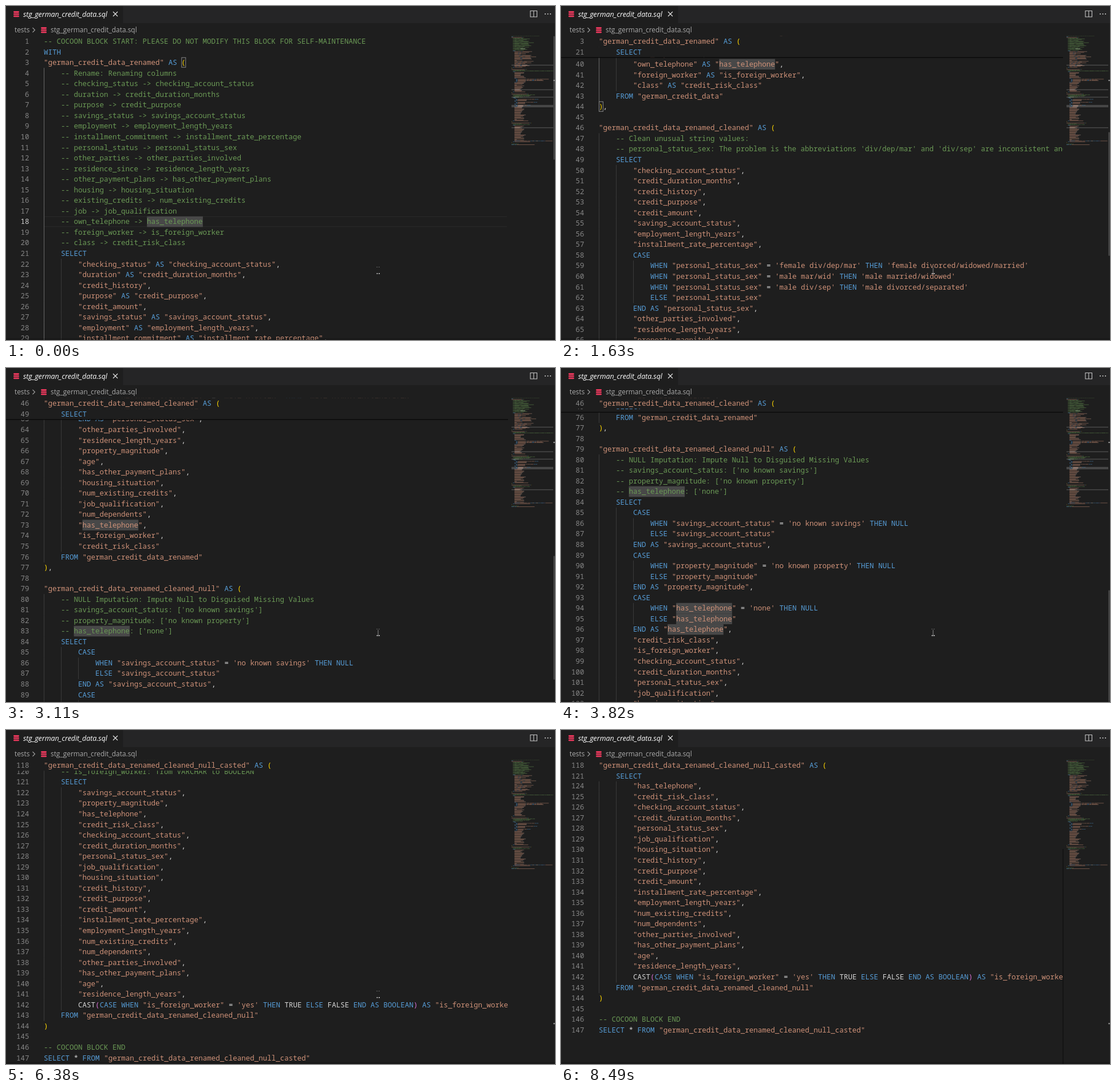
Recreate the animation shown at these times as an HTML page with a canvas. Size 959 by 584 pixels, loop 8.74 s.

```html
<!DOCTYPE html>
<html lang="en">
<head>
<meta charset="utf-8">
<title>stg_german_credit_data.sql</title>
<style>
  html, body { margin: 0; width: 100%; height: 100%; overflow: hidden; background: #1e1e1e; }
  canvas { display: block; }
</style>
</head>
<body>
<canvas id="stage" width="959" height="584"></canvas>
<script>
const ctx = document.getElementById('stage').getContext('2d');
const LOOP = 8740, CLICK = 4900;
const TOP = 52.6, LINE = 18.544, CHAR = 7.51, LEFT = 66, RIGHT = 877, WHEEL = 48.8;
const MAP = { x: 883, y: 52, line: 1.3015, char: 0.651 };
const CODE_FONT = '12.515px "Noto Sans Mono", monospace';
const UI_FONT = '11.9px "Open Sans", sans-serif';
const COLORS = { bg: '#1e1e1e', comment: '#6a9955', keyword: '#569cd6', string: '#ce9178', plain: '#d4d4d4' };
const WORD = 'has_telephone';

// ---- document text ----
const renames = ('checking_status>checking_account_status duration>credit_duration_months credit_history ' +
  'purpose>credit_purpose credit_amount savings_status>savings_account_status ' +
  'employment>employment_length_years installment_commitment>installment_rate_percentage ' +
  'personal_status>personal_status_sex other_parties>other_parties_involved ' +
  'residence_since>residence_length_years property_magnitude age ' +
  'other_payment_plans>has_other_payment_plans housing>housing_situation ' +
  'existing_credits>num_existing_credits job>job_qualification num_dependents ' +
  'own_telephone>has_telephone foreign_worker>is_foreign_worker class>credit_risk_class')
  .split(' ').map(s => s.split('>'));
const target = renames.map(r => r[r.length - 1]);
const rest = ('checking_account_status credit_duration_months personal_status_sex job_qualification ' +
  'housing_situation credit_history credit_purpose credit_amount installment_rate_percentage ' +
  'employment_length_years num_existing_credits num_dependents other_parties_involved ' +
  'has_other_payment_plans age residence_length_years').split(' ');

const quote = s => `"${s}"`;
const columns = names => names.map(n => `        ${quote(n)},`);
const withoutComma = list => [...list.slice(0, -1), list[list.length - 1].replace(/,$/, '')];
const caseOf = (name, whens) => ['        CASE',
  ...whens.map(([from, to]) => `            WHEN "${name}" = '${from}' THEN ${to}`),
  `            ELSE "${name}"`, `        END AS "${name}",`];
const block = (name, notes, body, from, close = '),') => [`"${name}" AS (`,
  ...notes.map(n => '    -- ' + n), '    SELECT', ...body, `    FROM "${from}"`, close, ''];

const BASE = 'german_credit_data', RENAMED = BASE + '_renamed', CLEANED = RENAMED + '_cleaned',
  NULLED = CLEANED + '_null', CASTED = NULLED + '_casted';
const lines = [
  '-- COCOON BLOCK START: PLEASE DO NOT MODIFY THIS BLOCK FOR SELF-MAINTENANCE',
  'WITH',
  ...block(RENAMED,
    ['Rename: Renaming columns', ...renames.filter(r => r[1]).map(r => r.join(' -> '))],
    withoutComma(renames.map(r => `        ${r.map(quote).join(' AS ')},`)), BASE),
  ...block(CLEANED,
    ['Clean unusual string values:',
      "personal_status_sex: The problem is the abbreviations 'div/dep/mar' and 'div/sep' are inconsistent and unclear."],
    [...columns(target.slice(0, 8)),
      ...caseOf('personal_status_sex', [
        ['female div/dep/mar', "'female divorced/widowed/married'"],
        ['male mar/wid', "'male married/widowed'"],
        ['male div/sep', "'male divorced/separated'"]]),
      ...withoutComma(columns(target.slice(9)))], RENAMED),
  ...block(NULLED,
    ['NULL Imputation: Impute Null to Disguised Missing Values',
      "savings_account_status: ['no known savings']",
      "property_magnitude: ['no known property']", "has_telephone: ['none']"],
    [...caseOf('savings_account_status', [['no known savings', 'NULL']]),
      ...caseOf('property_magnitude', [['no known property', 'NULL']]),
      ...caseOf(WORD, [['none', 'NULL']]),
      ...withoutComma(columns(['credit_risk_class', 'is_foreign_worker', ...rest]))], CLEANED),
  ...block(CASTED,
    ['Column Type Casting:', 'is_foreign_worker: from VARCHAR to BOOLEAN'],
    [...columns(['savings_account_status', 'property_magnitude', WORD, 'credit_risk_class', ...rest]),
      `        CAST(CASE WHEN "is_foreign_worker" = 'yes' THEN TRUE ELSE FALSE END AS BOOLEAN) AS "is_foreign_worker"`],
    NULLED, ')'),
  '-- COCOON BLOCK END',
  `SELECT * FROM "${CASTED}"`
];

// ---- syntax colours, indents and foldable ranges ----
const KEYWORD = /^(WITH|AS|SELECT|FROM|CASE|WHEN|THEN|ELSE|END|NULL|BOOLEAN)$/;
function tokenColor(text, line) {
  if (text.startsWith('--')) return COLORS.comment;
  if (/^["']/.test(text)) return COLORS.string;
  if (/^[()]$/.test(text)) return line.includes('CAST(') ? '#da70d6' : '#ffd700';
  return KEYWORD.test(text) ? COLORS.keyword : COLORS.plain;
}
const tokens = lines.map(line => [...line.matchAll(/--.*|"[^"]*"|'[^']*'|\w+|[^\s\w]/g)]
  .map(m => ({ text: m[0], col: m.index, color: tokenColor(m[0], line) })));
const depth = lines.map(line => line ? line.search(/\S/) / 4 : 0);
const marks = lines.map(line => [...line.matchAll(/\bhas_telephone\b/g)].map(m => m.index));
const ranges = [];
depth.forEach((d, i) => {
  if (!(depth[i + 1] > d)) return;
  let end = i + 1;
  while (depth[end + 1] > d) end++;
  ranges.push({ start: i, end, depth: d });
});

// ---- timeline: [ms, wheel notches] ----
const scrolls = [[0, 0], [250, 2], [370, 5], [490, 7], [640, 9], [1360, 12], [1630, 14],
  [2590, 17], [2710, 20], [3110, 23], [3540, 26], [3820, 28], [4660, 29], [4780, 30],
  [5300, 36], [5420, 39], [5570, 41], [6380, 45], [7860, 46]];
const pointers = [[0, 650, 463], [7060, 681, 498], [7210, 867, 578], [7330, 0, -50]];
const at = (table, t) => table.filter(row => row[0] <= t).pop();

// ---- drawing ----
function rect(x, y, w, h, color) {
  ctx.fillStyle = color;
  ctx.fillRect(x, y, w, h);
}
function label(text, x, y, color, font, align = 'left') {
  ctx.font = font;
  ctx.textAlign = align;
  ctx.fillStyle = color;
  ctx.fillText(text, x, y);
}
function stroke(path, color, width = 1) {
  ctx.strokeStyle = color;
  ctx.lineWidth = width;
  ctx.stroke(new Path2D(path));
}
const colX = col => LEFT + col * CHAR;

function drawCode(i, y, active) {
  label(i + 1, 40.5, y + 13.5, active ? '#d0d0d0' : '#858585', CODE_FONT, 'right');
  for (const t of tokens[i]) label(t.text, colX(t.col), y + 13.5, t.color, CODE_FONT);
}

function drawLine(i, y, s) {
  if (i === s.current) {
    rect(LEFT, y, 809, 1, '#2b2b2b');
    rect(LEFT, y + LINE - 1, 809, 1, '#2b2b2b');
  }
  for (let k = 0; k < depth[i]; k++) {
    const lit = k === s.guide.depth && i > s.guide.start && i <= s.guide.end;
    rect(LEFT + k * 4 * CHAR, y, 1, LINE + 0.5, lit ? '#6a6a6a' : '#3c3c3c');
  }
  if (!s.clicked) for (const col of marks[i]) rect(colX(col), y, WORD.length * CHAR, LINE, '#484848');
  if (i === s.guide.outer.start || i === s.guide.outer.end + 1) {
    const col = lines[i].search(/[()]/);
    ctx.strokeStyle = '#888';
    ctx.lineWidth = 1;
    ctx.strokeRect(colX(col) + 0.5, y + 0.5, CHAR - 0.5, LINE - 1.5);
  }
  drawCode(i, y, i === s.current);
  if (s.clicked && i === s.current) rect(colX(lines[i].length), y, 2, LINE - 1, '#aeafad');
}

function drawEditor(s) {
  ctx.save();
  ctx.beginPath();
  ctx.rect(0, TOP, RIGHT, 584 - TOP);
  ctx.clip();
  const first = Math.floor(s.scroll / LINE);
  for (let i = first; i < Math.min(lines.length, first + 30); i++) drawLine(i, TOP + i * LINE - s.scroll, s);

  // Pinned headers; an ending block pushes its own header up.
  let bottom = 0;
  const pinned = ranges.filter(r => r.start * LINE - s.scroll < r.depth * LINE &&
    (r.end + 1) * LINE - s.scroll > r.depth * LINE);
  for (const r of pinned.reverse()) {
    const y = Math.min(r.depth * LINE, (r.end + 1) * LINE - s.scroll - LINE);
    bottom = Math.max(bottom, y + LINE);
    rect(0, TOP + y, RIGHT, LINE, COLORS.bg);
    drawCode(r.start, TOP + y, false);
  }
  if (bottom && !s.clicked) rect(0, TOP + bottom - 0.3, RIGHT, 1.4, '#0a0a0a');
  ctx.restore();
}

function drawMinimap(s, t) {
  ctx.save();
  ctx.beginPath();
  ctx.rect(MAP.x, 50, 73, 534);
  ctx.clip();
  lines.forEach((line, i) => {
    const y = MAP.y + i * MAP.line;
    if (!s.clicked && marks[i].length) {
      if (i !== s.current) rect(MAP.x, y, 73, 1.4, '#4c4c4c');
      for (const col of marks[i]) rect(MAP.x + col * MAP.char, y, WORD.length * MAP.char, 1.3, '#707070');
    }
    ctx.globalAlpha = 0.5;
    for (const token of tokens[i])
      for (const m of token.text.matchAll(/\S+/g))
        rect(MAP.x + (token.col + m.index) * MAP.char, y, m[0].length * MAP.char, 0.9, token.color);
    ctx.globalAlpha = 1;
  });
  ctx.restore();
  rect(956, TOP + s.scroll * 0.246, 3, 216, '#424242');
  rect(956, TOP + s.current * LINE * 0.246 - 1, 3, 2, '#8a8a8a');
  const shade = Math.min(1, Math.max(0, (t - 7740) / 600));
  rect(876, 208, 2, 376, `rgba(0,0,0,${0.35 * shade})`);
}

function drawDatabase(x, y) {
  ctx.fillStyle = '#e8385c';
  for (let k = 0; k < 3; k++) {
    ctx.beginPath();
    ctx.roundRect(x - 5, y - 5 + k * 3.7, 10, 2.9, 1.4);
    ctx.fill();
  }
}

function drawHeader() {
  rect(0, 0, 959, TOP, COLORS.bg);
  rect(204.5, 0, 755, 30, '#252526');
  drawDatabase(18, 14);
  label('stg_german_credit_data.sql', 30, 18.5, '#fff', 'italic 12.4px "Open Sans", sans-serif');
  stroke('M187 10 L195 18 M195 10 L187 18', '#e8e8e8', 1.1);
  stroke('M916 8.5 H927.5 V19 H916 Z M921.8 8.5 V19', '#c5c5c5', 1.1);
  for (let k = 0; k < 3; k++) rect(941 + k * 4.6, 13, 1.8, 1.8, '#c5c5c5');
  label('tests', 15, 46, '#a9a9a9', UI_FONT);
  stroke('M46.5 38 L50.5 42 L46.5 46', '#a0a0a0', 1.1);
  drawDatabase(66, 42);
  label('stg_german_credit_data.sql', 78, 46, '#a9a9a9', UI_FONT);
}

function drawPointer(t) {
  const [, x, y] = at(pointers, t);
  if (t >= 250 && t < CLICK) {
    stroke(`M${x} ${y - 5} V${y + 6}`, '#8a8a8a', 1);
  }
  for (const dx of [-2.5, 1]) {
    rect(x + dx, y - 7, 1.3, 1, '#8a8a8a');
    rect(x + dx, y + 4, 1.8, 1.6, '#d8d8d8');
  }
}

function draw(t) {
  const clicked = t >= CLICK, current = clicked ? 101 : 17;
  const around = ranges.filter(r => r.start < current && r.end >= current);
  const guide = { ...around[around.length - 1], outer: around[0] };
  const state = { clicked, current, guide, scroll: at(scrolls, t)[1] * WHEEL };
  rect(0, 0, 959, 584, COLORS.bg);
  drawEditor(state);
  drawMinimap(state, t);
  drawHeader();
  drawPointer(t);
  rect(0, 581, 959, 3, 'rgba(0,0,0,.2)');
}

function tick() {
  draw(performance.now() % LOOP);
  requestAnimationFrame(tick);
}
tick();
</script>
</body>
</html>
```
